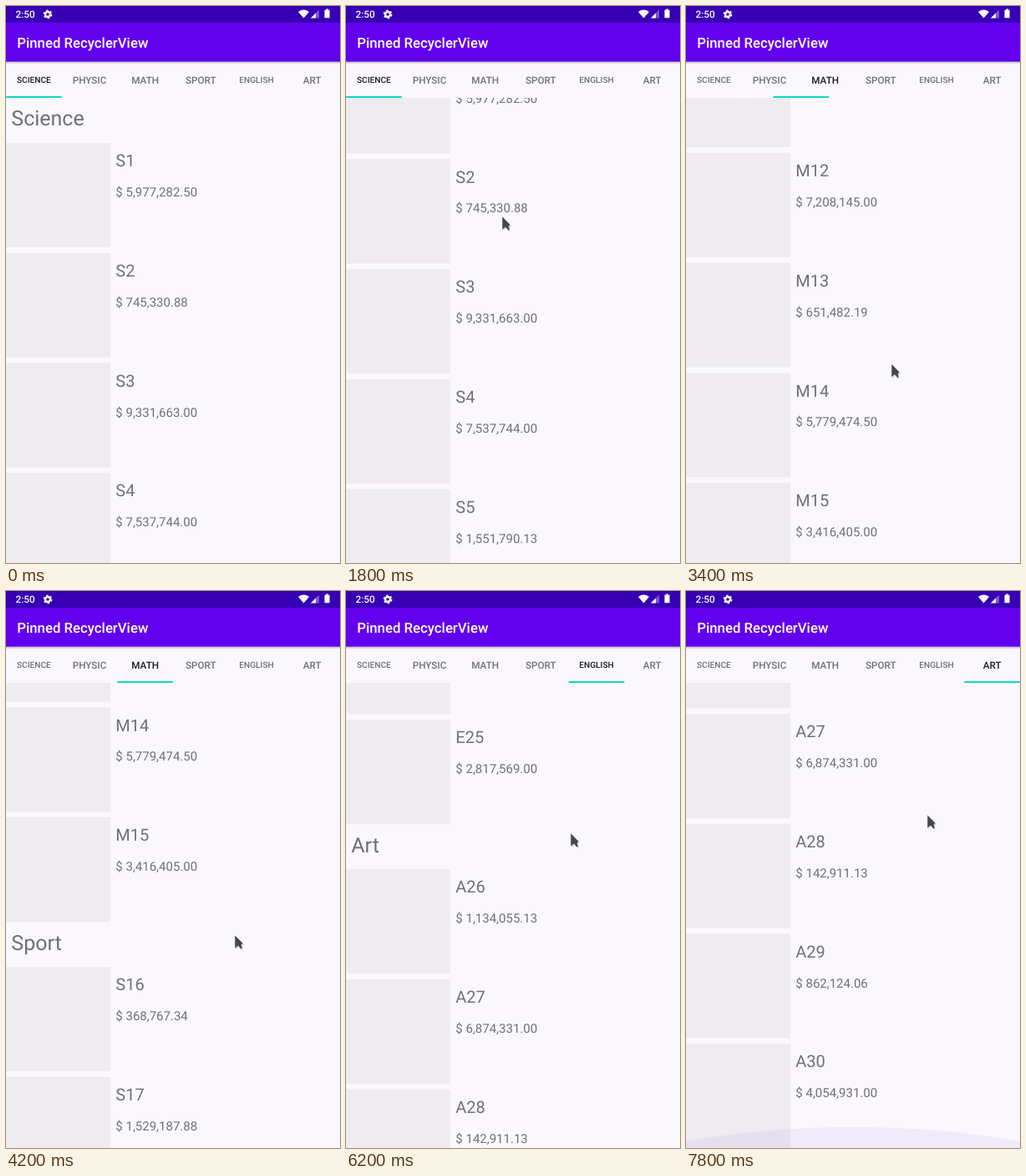
Recreate the animation shown at these times as an HTML page. Size 400x667 px, loop 8000 ms.

```html
<!DOCTYPE html>
<html lang="en">
<head>
<meta charset="utf-8">
<title>Pinned list</title>
<style>
  html, body { margin: 0; width: 100%; height: 100%; overflow: hidden; background: #faf8fc; }
  svg { display: block; font-family: Roboto, sans-serif; text-rendering: geometricPrecision; }
  #list text { fill: #727073; }
  .header { font-size: 25px; }
  .name { font-size: 20px; }
  .price { font-size: 15px; }
  .tab { font-size: 11.67px; font-weight: 500; fill: #727073; text-anchor: middle; }
  .tab.small { font-size: 10.1px; }
  .tab.active { fill: #1c1b1d; }
  .bar { font-weight: 500; fill: #fff; }
</style>
</head>
<body>
<svg width="400" height="667" viewBox="0 0 400 667">
  <defs>
    <clipPath id="view"><rect y="110" width="400" height="557"/></clipPath>
    <linearGradient id="shade" x2="0" y2="1">
      <stop stop-color="#000" stop-opacity=".24"/>
      <stop offset="1" stop-color="#000" stop-opacity="0"/>
    </linearGradient>
  </defs>
  <rect width="400" height="667" fill="#faf8fc"/>
  <g clip-path="url(#view)">
    <g id="list"></g>
    <ellipse id="glow" cx="200" rx="480" fill="#6200ee"/>
  </g>
  <rect width="400" height="20" fill="#3700b3"/>
  <rect y="20" width="400" height="46.7" fill="#6200ee"/>
  <rect y="66.7" width="400" height="3.3" fill="url(#shade)"/>
  <text class="bar" x="11.5" y="14" font-size="11.7">2:50</text>
  <g fill="none" stroke="#fff">
    <circle cx="50" cy="10" r="3" stroke-width="2.4"/>
    <circle cx="50" cy="10" r="4.6" stroke-width="1.6" stroke-dasharray="2.4 2.417"/>
  </g>
  <g fill="#fff" transform="translate(0 -.5)">
    <path d="M350 7.4Q356.5 2.6 363 7.4L356.5 15Z"/>
    <path d="M365 15L375 5V15Z" opacity=".35"/>
    <path d="M365 15L371 9V15Z"/>
    <path d="M381.5 5.2H383.2V4H386V5.2H387.6V14.8H381.5Z"/>
  </g>
  <text class="bar" x="13.3" y="50" font-size="16.75">Pinned RecyclerView</text>
  <g id="tabs"></g>
  <rect id="indicator" y="108" width="66.67" height="2" fill="#10d6c4"/>
  <g id="cursor">
    <path d="M1 1.5V17L5 14.5 8.5 18.5 10 17 9 13 11.5 11.5Z" fill="#000" opacity=".13"/>
    <path d="M0 0V16L4 13 7.5 17 9 15.5 8 11.5 10 10Z" fill="#48464b" stroke="#fff" stroke-opacity=".6" stroke-width=".8"/>
  </g>
</svg>
<script>
const $ = id => document.getElementById(id);
const LOOP = 8000, STEP = 200, TAB = 400 / 6;
const PITCH = 131.75, HEADER = 47.3, FIRST = 164, PER_SECTION = 5;
const SECTION = PITCH * PER_SECTION + HEADER;
const FLING = 1000, GLOW_START = 7000, GLOW_TIME = 1200;

const sections = ['Science', 'Physic', 'Math', 'Sport', 'English', 'Art'];
const prices = `5,977,282.50 745,330.88 9,331,663.00 7,537,744.00 1,551,790.13
  982,061.56 8,535,314.00 9,962,225.00 8,868,343.00 4,127,650.25
  2,643,918.50 7,208,145.00 651,482.19 5,779,474.50 3,416,405.00
  368,767.34 1,529,187.88 3,655,587.75 7,591,574.00 6,022,628.50
  4,480,326.00 913,574.63 8,215,907.00 3,702,461.25 2,817,569.00
  1,134,055.13 6,874,331.00 142,911.13 862,124.06 4,054,931.00`.split(/\s+/);

const flings = [
  { start: 1600, distance: 744 },
  { start: 2800, distance: 1088 },
  { start: 4200, distance: 467 },
  { start: 5200, distance: 1062 },
  { start: 6200, distance: 318 }
];
// Pointer stops: time, x, y
const stops = [
  [600, 205, 530], [1800, 187, 252], [2600, 218, 445], [4200, 274, 412],
  [5200, 273, 316], [6200, 269, 290], [7800, 289, 268]
];

const clamp = p => Math.min(1, Math.max(0, p));
const flingEase = p => (1 - (1 - p) ** 2) ** 1.85;

function scrollAt(t) {
  return flings.reduce((sum, f) => sum + f.distance * flingEase(clamp((t - f.start) / FLING)), 0);
}

function pointerAt(t) {
  const next = Math.max(1, stops.findIndex(s => s[0] >= t));
  const [t0, x0, y0] = stops[next - 1], [t1, x1, y1] = stops[next];
  const p = clamp((t - t0) / (t1 - t0));
  return [x0 + (x1 - x0) * p, y0 + (y1 - y0) * p];
}

// Time at which each section's header reaches the top
const tabTimes = sections.map((_, i) => {
  let t = 0;
  while (scrollAt(t) < i * SECTION) t += 5;
  return t;
});

$('list').innerHTML = prices.map((price, i) => {
  const s = Math.floor(i / PER_SECTION), y = FIRST + PITCH * i + HEADER * s;
  const header = i % PER_SECTION ? '' : `<text class="header" x="6.3" y="${y - 20.6}">${sections[s]}</text>`;
  return `${header}<rect y="${y}" width="125" height="125" fill="#eeecef"/>
    <text class="name" x="131.3" y="${y + 28.2}">${sections[s][0]}${i + 1}</text>
    <text class="price" x="131.3" y="${y + 64}">$ ${price}</text>`;
}).join('');

$('tabs').innerHTML = sections.map((name, i) => {
  const small = name.length > 6;
  return `<text class="tab${small ? ' small' : ''}" x="${TAB * (i + 0.5)}" y="${small ? 92 : 93}">${name.toUpperCase()}</text>`;
}).join('');
const tabs = [...$('tabs').children];

function draw(t) {
  $('list').setAttribute('transform', `translate(0 ${-scrollAt(t)})`);

  const active = tabTimes.filter(time => time <= t).length - 1;
  tabs.forEach((tab, i) => tab.classList.toggle('active', i === active));
  const rest = active ? 1 - clamp((t - tabTimes[active]) / 300) : 0;
  $('indicator').setAttribute('x', TAB * (active - rest ** 2.7));

  $('cursor').setAttribute('transform', `translate(${pointerAt(t)})`);
  $('cursor').setAttribute('visibility', t < stops[0][0] ? 'hidden' : 'visible');

  const height = 29 * Math.sin(Math.PI * clamp((t - GLOW_START) / GLOW_TIME)), ry = height * 7.5;
  $('glow').setAttribute('cy', 667 - height + ry);
  $('glow').setAttribute('ry', ry);
  $('glow').setAttribute('opacity', height * 0.0022);
}

function tick() {
  const t = performance.now() % LOOP;
  draw(Math.floor(t / STEP) * STEP);
  requestAnimationFrame(tick);
}
tick();
</script>
</body>
</html>
```
